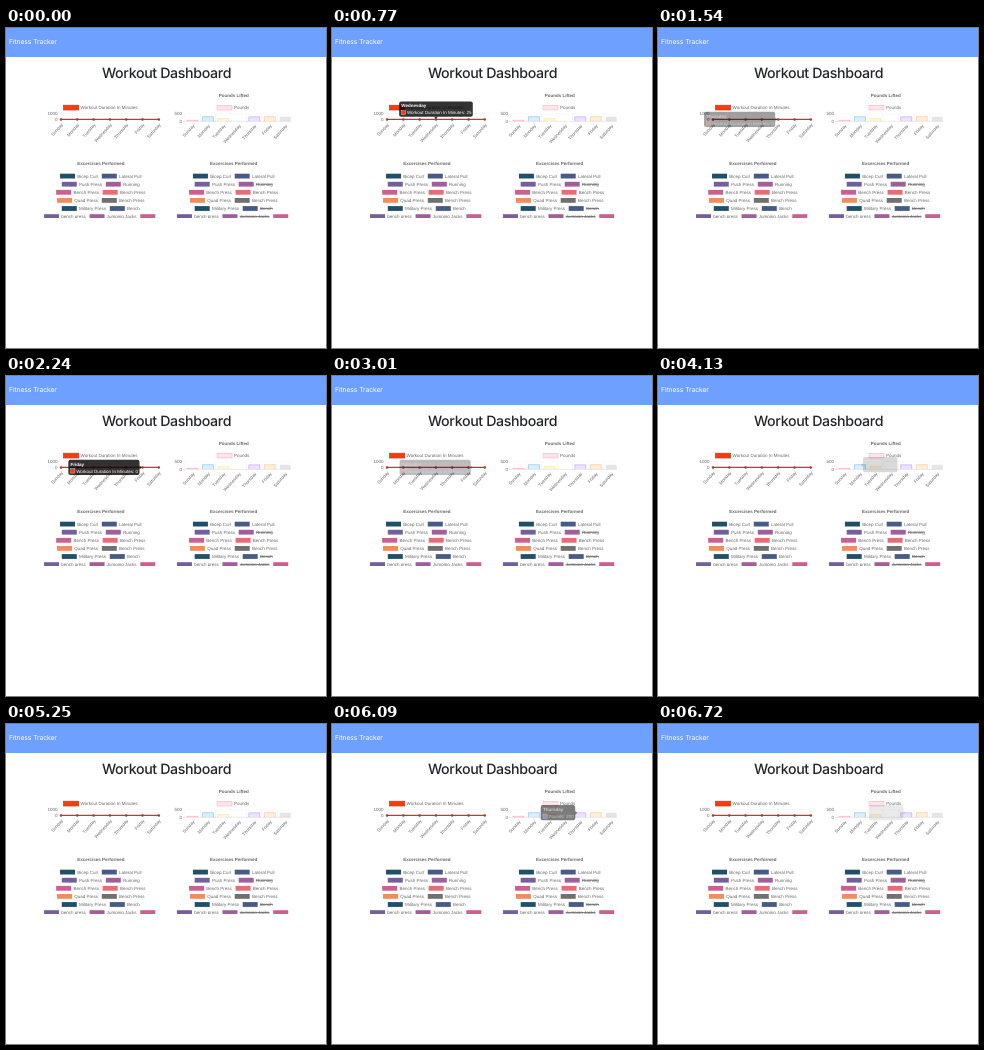
These frames come from a looping animation (320 px wide and 320 px high, 6790 ms). An HTML page:

```html
<!DOCTYPE html>
<html lang="en">
<head>
<meta charset="utf-8">
<title>Workout Dashboard</title>
<style>
  html, body { margin: 0; width: 100%; height: 100%; overflow: hidden; background: #fff; }
  svg { display: block; width: 100vw; height: 100vh; }
  text { font: 4.5px "Liberation Sans", Arial, sans-serif; fill: #666; text-rendering: geometricPrecision; }
  .bold { font-weight: 700; }
  .brand { font: 6.8px Inter, sans-serif; letter-spacing: -.1px; fill: #fff; }
  .head { font: 500 14.2px Inter, sans-serif; letter-spacing: -.35px; fill: #212529; }
  .tip text { fill: #fff; }
</style>
</head>
<body>
<svg id="stage" viewBox="0 0 320 320"></svg>
<script>
const LOOP = 6790, STEP = 70, FADE = 400;
const stage = document.getElementById('stage');
const pen = document.createElement('canvas').getContext('2d');

function add(parent, tag, attrs, content) {
  const el = document.createElementNS('http://www.w3.org/2000/svg', tag);
  for (const key in attrs) el.setAttribute(key, attrs[key]);
  if (content !== undefined) el.textContent = content;
  parent.appendChild(el);
  return el;
}
const rect = (parent, x, y, width, height, fill, more) =>
  add(parent, 'rect', { x, y, width, height, fill, ...more });
const line = (x1, y1, x2, y2, stroke, width) =>
  add(stage, 'line', { x1, y1, x2, y2, stroke, 'stroke-width': width });
const label = (parent, x, y, content, more) =>
  add(parent, 'text', { x, y, ...more }, content);
function textWidth(content) {
  pen.font = '100px "Liberation Sans", Arial, sans-serif';
  return pen.measureText(content).width * 0.045;
}

const middle = { 'text-anchor': 'middle' };
const end = { 'text-anchor': 'end' };
const title = { ...middle, class: 'bold' };
const days = ['Sunday', 'Monday', 'Tuesday', 'Wednesday', 'Thursday', 'Friday', 'Saturday'];
const lineX = i => 55 + 16.3 * i;
const barX = i => 186.5 + 15.45 * i;
const GRID = 'rgba(0,0,0,.07)';
const RED = '#f53c10';

// Header
rect(stage, 0, 0, 320, 29, '#6ea0ff');
label(stage, 3, 16.3, 'Fitness Tracker', { class: 'brand' });
label(stage, 160.5, 50, 'Workout Dashboard', { ...middle, class: 'head' });

function dayLabels(xAt, y) {
  days.forEach((day, i) => label(stage, 0, 1.5, day,
    { ...end, transform: `translate(${xAt(i) + 1.2} ${y}) rotate(-48)` }));
}

// Line chart
rect(stage, 57.5, 77.2, 15.2, 4.8, RED, { stroke: '#d8361c', 'stroke-width': .7 });
label(stage, 74.6, 81.2, 'Workout Duration In Minutes');
label(stage, 51.5, 87.2, '1000', end);
label(stage, 51.5, 93.2, '0', end);
line(52, 85.6, 153, 85.6, GRID, .4);
days.forEach((day, i) => line(lineX(i), 85.6, lineX(i), 94.5, GRID, .4));
line(lineX(0), 91.4, lineX(6), 91.4, '#c23a2c', 1.1);
days.forEach((day, i) => add(stage, 'circle', { cx: lineX(i), cy: 91.4, r: 1.25, fill: '#b8322a' }));
dayLabels(lineX, 96);

// Bar chart
const hues = ['255,99,132', '54,162,235', '255,206,86', '75,192,192', '153,102,255', '255,159,64', '0,0,0'];
label(stage, 227.7, 69, 'Pounds Lifted', title);
rect(stage, 211, 77.2, 15, 4.8, `rgba(${hues[0]},.17)`, { stroke: `rgba(${hues[0]},.6)`, 'stroke-width': .4 });
label(stage, 228, 81.2, 'Pounds');
label(stage, 176, 87.3, '500', end);
label(stage, 176, 94.6, '0', end);
line(176.5, 85.8, 285, 85.8, GRID, .4);
line(176.5, 93.3, 285, 93.3, 'rgba(0,0,0,.2)', .4);
for (let i = 0; i < 7; i++) line(178.7 + 15.45 * i, 85.8, 178.7 + 15.45 * i, 95, GRID, .4);
[1, 4.6, 2.7, 0, 4.5, 4.6, 4.5].forEach((h, i) => {
  const x = barX(i) - 5.5, top = 93.3 - h;
  rect(stage, x, top, 11, h, `rgba(${hues[i]},${i === 6 ? .1 : .18})`);
  if (i < 6 && h) add(stage, 'path', {
    d: `M${x} 93.3V${top}h11V93.3`, fill: 'none', stroke: `rgba(${hues[i]},.9)`, 'stroke-width': .4
  });
});
dayLabels(barX, 97);

// Exercise legends
const palette = ['#204f68', '#465c87', '#735f9c', '#a05f9b', '#cb608f', '#e86b76', '#f28c5c', '#707070'];
const rows = [
  ['Bicep Curl', 'Lateral Pull'], ['Push Press', 'Running'], ['Bench Press', 'Bench Press'],
  ['Quad Press', 'Bench Press'], ['Military Press', 'Bench'], ['bench press', 'Jumping Jacks', '']
];
const clip = add(add(stage, 'defs', {}), 'clipPath', { id: 'cut' });
rect(clip, 0, 120, 320, 70, '#000');

function legend(center, struck) {
  const group = add(stage, 'g', { 'clip-path': 'url(#cut)' });
  label(group, center, 137.1, 'Excercises Performed', title);
  let n = 0;
  rows.forEach((names, r) => {
    const widths = names.map(name => 17.25 + textWidth(name));
    const total = widths.reduce((a, b) => a + b, 3.75 * (names.length - 1));
    const y = 148.1 + 8.1 * r;
    let x = center - total / 2;
    names.forEach((name, k) => {
      rect(group, x, y - 2.4, 15, 4.8, palette[n++ % 8]);
      label(group, x + 17.25, y + 1.5, name);
      if (struck.includes(name)) rect(group, x + 17.25, y - .4, widths[k] - 17.25, .8, '#666');
      x += widths[k] + 3.75;
    });
  });
}
legend(94.8, []);
legend(227.7, ['Running', 'Bench', 'Jumping Jacks']);

// Tooltips: [chart, day, value, shown at, hidden at]
const charts = {
  line: { xAt: lineX, y: 91.4, name: 'Workout Duration In Minutes', color: () => RED },
  bar: { xAt: barX, y: 88.7, name: 'Pounds', color: i => `rgb(${hues[i]})` }
};
const tips = [
  ['line', 2, 0, 40, 360], ['line', 3, 25, 460, 850], ['line', 4, 0, 1100, 1470],
  ['line', 5, 0, 1800, 2500], ['line', 6, 0, 2973, 3440],
  ['bar', 1, 200, 4110, 4740], ['bar', 4, 200, 6000, 6545]
].map(makeTip);

function makeTip([kind, day, value, from, to]) {
  const chart = charts[kind], px = chart.xAt(day), h = 15.2;
  const body = `${chart.name}: ${value}`;
  const w = textWidth(body) + 9.2;
  let x, y = chart.y - h / 2, caret;
  if (day === 3) {
    x = px - w / 2;
    y = chart.y - h - 2.7;
    caret = `M${w / 2 - 2} ${h}h4l-2 2z`;
  } else if (day < 3) {
    x = px + 3;
    caret = `M0 ${h / 2 - 2}v4l-2 -2z`;
  } else {
    x = px - 3 - w;
    caret = `M${w} ${h / 2 - 2}v4l2 -2z`;
  }
  const el = add(stage, 'g', { class: 'tip', opacity: 0 });
  const back = add(el, 'g', { opacity: .8 });
  rect(back, 0, 0, w, h, '#000', { rx: 2 });
  add(back, 'path', { d: caret });
  const words = add(el, 'g', {});
  label(words, 2.2, 5.9, days[day], { class: 'bold' });
  rect(words, 2.2, 8.9, 4.4, 4.4, chart.color(day), { stroke: '#fff', 'stroke-width': .3 });
  label(words, 7.8, 12.8, body);
  return { kind, x, y, from, to, el, words };
}

const easeOut = t => 1 - Math.pow(1 - Math.min(1, Math.max(0, t)), 4);

function draw(now) {
  const t = Math.floor((now % LOOP) / STEP) * STEP;
  tips.forEach((tip, i) => {
    const p = easeOut((Math.min(t, tip.to) - tip.from) / FADE);
    const alpha = p * (1 - easeOut((t - tip.to) / FADE));
    const prev = tips[i - 1];
    const start = prev && prev.kind === tip.kind ? prev : tip;
    const x = start.x + (tip.x - start.x) * p;
    const y = start.y + (tip.y - start.y) * p;
    tip.el.setAttribute('opacity', alpha.toFixed(3));
    tip.words.setAttribute('opacity', alpha.toFixed(3));
    tip.el.setAttribute('transform', `translate(${x} ${y})`);
  });
}

const began = performance.now();
function tick() {
  draw(performance.now() - began);
  requestAnimationFrame(tick);
}
tick();
</script>
</body>
</html>
```
